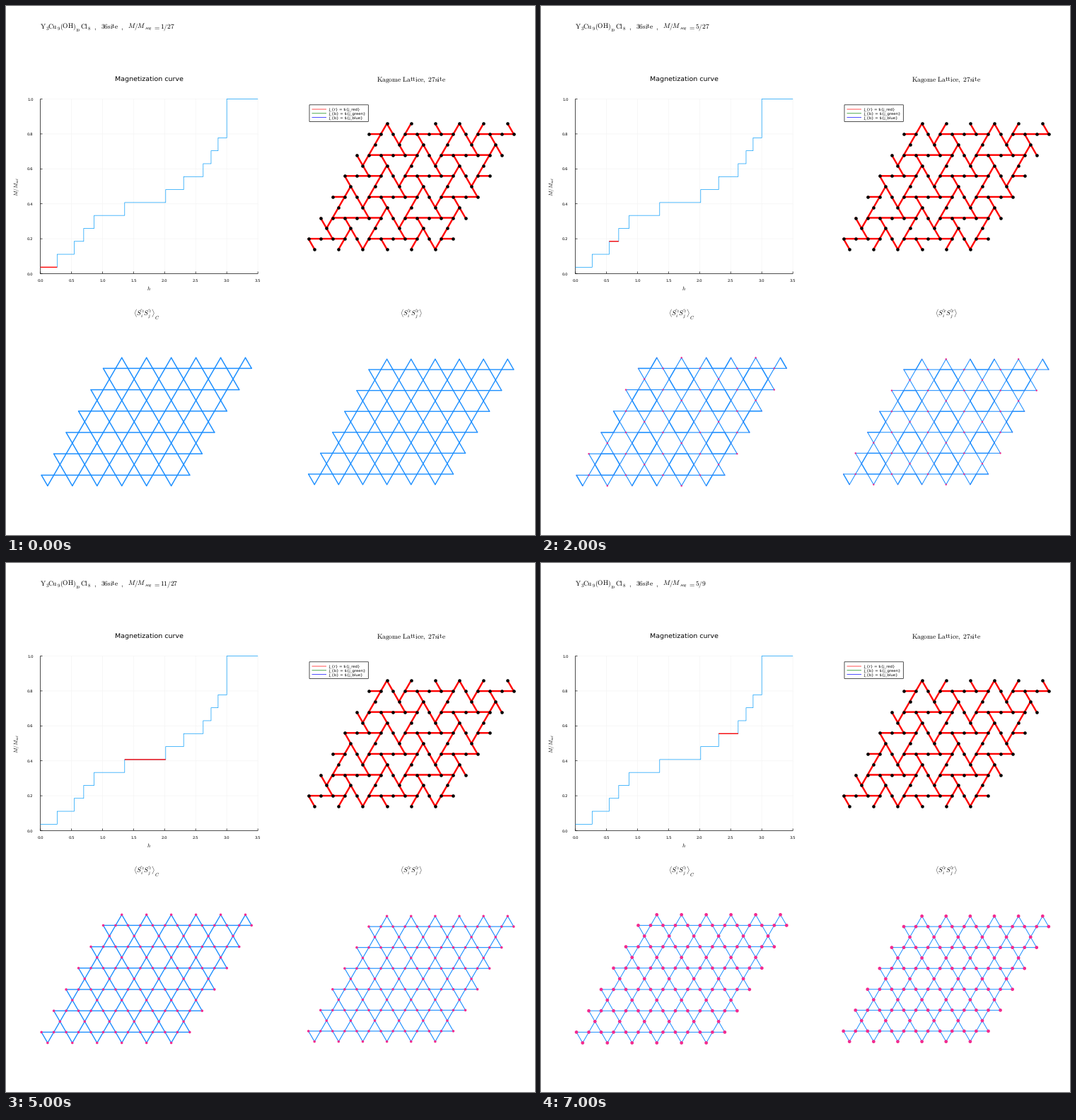
Animation of 748 by 748 pixels, one loop 8000 ms. Source, as a matplotlib script:

```python
import matplotlib.pyplot as plt
import numpy as np
from matplotlib.animation import FuncAnimation
from matplotlib.collections import LineCollection
from matplotlib.patches import Rectangle

SIZE, DPI = 748, 100
PT = 72 / DPI  # points per pixel
THIN = 0.68    # basic stroke in pixels
BLUE, PINK, SKY = "#1e90ff", "#f32a8f", "#009afa"

plt.rcParams["font.family"] = "DejaVu Sans"
plt.rcParams["mathtext.fontset"] = "cm"
plt.rcParams["text.hinting"] = "none"
plt.rcParams["path.snap"] = False
fig = plt.figure(figsize=(SIZE / DPI, SIZE / DPI), dpi=DPI, facecolor="white")
ax = fig.add_axes([0, 0, 1, 1])
ax.set(xlim=(0, SIZE), ylim=(SIZE, 0))
ax.axis("off")


def line(xs, ys, color, width=THIN, **kw):
    return ax.plot(xs, ys, color=color, lw=width * PT,
                   solid_capstyle="butt", **kw)[0]


def label(x, y, text, size, **kw):
    kw.setdefault("va", "baseline")
    return ax.text(x, y, text, fontsize=size * PT, color="black", **kw)


def roman(s):
    return r"$\mathrm{" + s + "}$"


# ---- kagome lattice in units of (site spacing, row) ----
def kagome():
    sites, bonds = set(), []
    for r in range(6):
        for c in range(12):
            u = c - r
            left, right = (u, r), (u + 1, r)
            apex = (u + 0.5, r - 0.5 if c % 2 else r + 0.5)
            v = (u - 3 * r) % 6
            sites.update((left, right, apex))
            bonds += [(left, right, v not in (1, 2)),
                      (left, apex, v in (1, 2, 3, 4)),
                      (right, apex, v in (0, 1, 2, 5))]
    return sorted(sites), bonds


SITES, BONDS = kagome()


def is_mid(s):
    return s[1] % 1 != 0


def is_hex(s):
    u, r = s
    if is_mid(s):
        return (u - 3 * (r + 0.5)) % 6 == 3.5
    return (u - 3 * r) % 3 == 2


def is_big(s):
    return not is_mid(s) and s[0] % 3 == 0


class Lattice:
    def __init__(self, x0, y0, dx, dy):
        self.x0, self.y0, self.dx, self.dy = x0, y0, dx, dy

    def at(self, s):
        return self.x0 + self.dx * s[0], self.y0 + self.dy * s[1]

    def lines(self, bonds, **kw):
        segs = [(self.at(a), self.at(b)) for a, b, _ in bonds]
        return ax.add_collection(LineCollection(segs, capstyle="round", **kw))

    def dots(self, **kw):
        return ax.scatter(*zip(*map(self.at, SITES)), linewidths=0, **kw)


def area(r):
    return (2 * np.asarray(r) * PT) ** 2


# ---- header ----
for x, text in ((48.5, "Y"), (59.5, "Cu"), (76, "(OH)"), (105, "Cl"),
                (124.5, ","), (134, "36site"), (162.5, ",")):
    label(x, 32, roman(text), 9.5)
for x, text in ((55.7, "3"), (71.8, "9"), (115.2, "8")):
    label(x, 34, roman(text), 6.8)
label(98, 36, roman("19"), 5.8)
label(172, 32, "$M/M$", 9.5)
label(196.5, 34, "$sat$", 6.6)
label(208.3, 32, "$=$", 9.5)
fraction = label(218, 33, "", 9.5)

# ---- magnetization curve ----
EDGES = [0, 0.271, 0.545, 0.698, 0.866, 1.357, 2.017, 2.306, 2.62, 2.747,
         2.86, 3.0, 3.5]
LEVELS = [n / 27 for n in range(1, 23, 2)] + [1]


def px(h):
    return 48.5 + 87.9 * np.asarray(h)


def py(m):
    return 378.5 - 247 * np.asarray(m)


for h in np.arange(0, 3.6, 0.5):
    line([px(h)] * 2, [131.5, 378.5], "#f4f4f4")
    line([px(h)] * 2, [375.5, 378.5], "black")
    label(px(h), 389.5, f"{h:.1f}", 5.43, ha="center")
for m in np.arange(0, 1.1, 0.2):
    line([48.5, 356.2], [py(m)] * 2, "#f4f4f4")
    line([48.5, 51.5], [py(m)] * 2, "black")
    label(38.5, py(m) + 2, f"{m:.1f}", 5.43, ha="right")
line([48.5, 48.5, 356.2], [131.5, 378.5, 378.5], "black")
line(px(np.repeat(EDGES, 2)[1:-1]), py(np.repeat(LEVELS, 2)), SKY)
plateau = line([], [], "red", 2 * THIN)

label(202.3, 106.5, "Magnetization curve", 9.5, ha="center")
label(202, 401.5, "$h$", 7.6, ha="center")
label(15.5, 255, "$M/M_{sat}$", 7.5, ha="center", va="center", rotation=90)

# ---- exchange bonds ----
label(572.6, 107, roman(r"Kagome\ Lattice,\ 27site"), 9.5, ha="center")
model = Lattice(513, 181.1, 17.07, 29.6)
model.lines([b for b in BONDS if b[2]], colors="red", linewidths=2.4 * PT,
            zorder=2)
model.dots(s=area(2.3), color="black", zorder=3)

ax.add_patch(Rectangle((429, 139.8), 83.3, 23.6, fc="white", ec="black",
                       lw=THIN * PT, zorder=4))
KEYS = [("red", "J_{r} = ${j_red}"), ("green", "J_{b} = ${j_green}"),
        ("blue", "J_{b} = ${j_blue}")]
for k, (color, text) in enumerate(KEYS):
    y = 146 + 5.8 * k
    line([432.5, 453], [y, y], color, zorder=5)
    label(456.7, y + 2, text, 5.43, parse_math=False, zorder=5)

# ---- correlations ----
for x, axis in ((180, "z"), (557, "x")):
    pair = r"$\langle\hat{S^%s_i}\hat{S^%s_j}\rangle$" % (axis, axis)
    label(x, 438, pair, 9.4)
label(210, 443, "$C$", 6.8)


def radius(s, i):
    """Dot radius in pixels: local moment at plateau i."""
    if i <= 2:
        return i / 2 * (1.2 if is_hex(s) else 0.35)
    if i == 3:
        return (radius(s, 2) + radius(s, 4)) / 2
    if i == 4:
        return 2.3 if is_big(s) else 1.2
    return (1.75, 2.05, 2.35)[i - 5]


def width(bond, i, cross):
    """Line width in pixels: pair correlation at plateau i."""
    a, b, _ = bond
    if i == 0:
        return 1.4 if cross else 1.5
    if i in (1, 3):
        return (width(bond, i - 1, cross) + width(bond, i + 1, cross)) / 2
    if i == 2:
        weak = is_hex(a) or is_hex(b)
        return (1.15 if weak else 1.6) - 0.1 * cross
    if i == 4:
        weak = a[1] == b[1] or is_big(a) or is_big(b)
        if cross:
            return 0.95 if weak else 1.35
        return 1.2 if weak else 1.75
    return ((1.4, 1.2, 1.0), (1.15, 1.1, 1.0))[cross][i - 5]


panels = []
for cross, geo in enumerate([(137.5, 512.4, 17.48, 30.2),
                             (513, 514.1, 17.07, 29.56)]):
    lat = Lattice(*geo)
    panels.append((cross, lat.lines(BONDS, colors=BLUE, zorder=2),
                   lat.dots(s=1, color=PINK, zorder=3)))

FRACTIONS = ["1/27", "1/9", "5/27", "7/27", "1/3", "11/27", "13/27", "5/9"]


def update(i):
    fraction.set_text(roman(FRACTIONS[i]))
    plateau.set_data(px(EDGES[i:i + 2]), py([LEVELS[i]] * 2))
    for cross, lines, dots in panels:
        lines.set_linewidths([width(b, i, cross) * PT for b in BONDS])
        dots.set_sizes(area([radius(s, i) for s in SITES]))
    return []


anim = FuncAnimation(fig, update, frames=8, interval=1000, repeat=True,
                     repeat_delay=0, blit=False)
plt.show()
```
